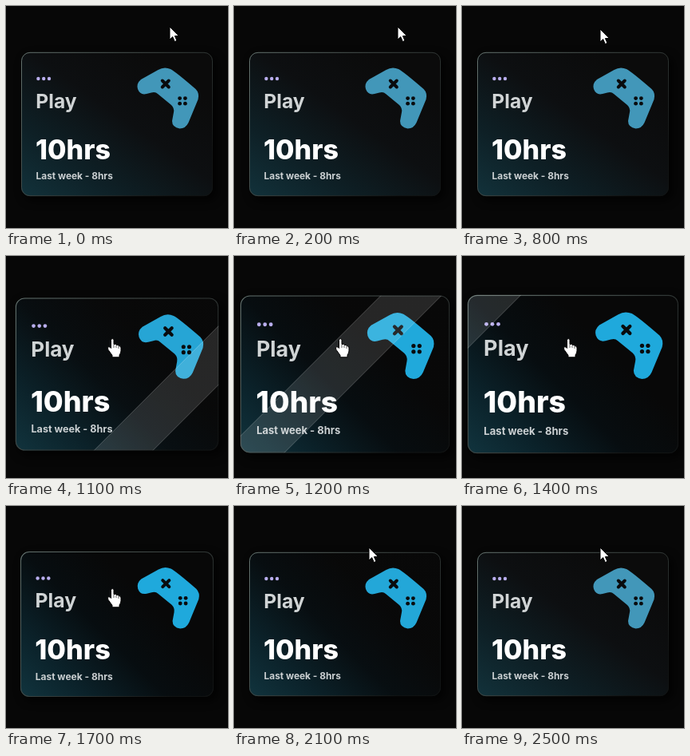
An HTML page for the animation above (2.6 s loop, 278 by 278 pixels).

```html
<!DOCTYPE html>
<html lang="en">
<head>
<meta charset="utf-8">
<title>Play time card</title>
<style>
  html, body { margin: 0; width: 100%; height: 100%; overflow: hidden; background: #070707; }
  svg { display: block; width: 100vw; height: 100vh; }
  text { font-family: Inter, Roboto, sans-serif; }
</style>
</head>
<body>
<svg viewBox="0 0 278 278">
  <defs>
    <linearGradient id="restFill" x1="0" y1="1" x2=".8" y2=".15">
      <stop offset="0" stop-color="#12323b"/>
      <stop offset=".3" stop-color="#0e2026"/>
      <stop offset=".65" stop-color="#0d0f11"/>
      <stop offset="1" stop-color="#0b0b0b"/>
    </linearGradient>
    <linearGradient id="hoverFill" gradientUnits="userSpaceOnUse" x1="19" y1="238" x2="159" y2="98">
      <stop offset="0" stop-color="#11343e"/>
      <stop offset=".3" stop-color="#0b222a"/>
      <stop offset=".65" stop-color="#070d10"/>
      <stop offset="1" stop-color="#080808"/>
    </linearGradient>
    <linearGradient id="edge" x1="0" y1="0" x2="1" y2=".7">
      <stop offset="0" stop-color="#65736f"/>
      <stop offset=".5" stop-color="#3c4442"/>
      <stop offset="1" stop-color="#111313"/>
    </linearGradient>
    <filter id="blur" x="-20%" y="-20%" width="140%" height="140%">
      <feGaussianBlur stdDeviation="6"/>
    </filter>
    <clipPath id="cardClip"><rect x="19" y="58" width="240" height="180" rx="11"/></clipPath>
  </defs>

  <rect width="278" height="278" fill="#070707"/>
  <g id="card">
    <rect x="22" y="62" width="243" height="182" rx="12" fill="#020202" opacity=".7" filter="url(#blur)"/>
    <rect x="19" y="58" width="240" height="180" rx="11" fill="url(#restFill)"/>
    <rect id="glow" x="19" y="58" width="240" height="180" rx="11" fill="url(#hoverFill)"/>
    <rect x="19.5" y="58.3" width="239" height="179.4" rx="10.5" fill="none" stroke="url(#edge)"/>

    <g fill="#b9aeee">
      <circle cx="40.4" cy="91" r="2.2"/>
      <circle cx="47.2" cy="91" r="2.2"/>
      <circle cx="54" cy="91" r="2.2"/>
    </g>
    <text x="37.3" y="127.5" font-size="24.6" font-weight="700" fill="#d0d4d5">Play</text>
    <text x="37" y="192" font-size="34" font-weight="800" fill="#fff">10hrs</text>
    <text x="37.5" y="217" font-size="11.9" font-weight="650" fill="#cbd0d2">Last week - 8hrs</text>

    <path id="pad" d="M190.5 80Q198 75.5 206 79Q212 82 237.5 104Q242.5 109 240.5 117L228.5 146Q225 153.5 217.5 153.5Q208 152 208 144L210 133Q211 128 207 124L190 110Q187 107 182 108.5L176 110Q168 112 165 104Q163 97 169 92Z"/>
    <path d="M195.8 93.5L203.8 101.5M203.8 93.5L195.8 101.5" stroke="#090b0d" stroke-width="4" stroke-linecap="round"/>
    <g fill="#090b0d">
      <circle cx="217.6" cy="115.6" r="2.4"/>
      <circle cx="224.4" cy="115.6" r="2.4"/>
      <circle cx="217.6" cy="122.2" r="2.4"/>
      <circle cx="224.4" cy="122.2" r="2.4"/>
    </g>

    <g clip-path="url(#cardClip)">
      <path id="sheen" d="M0 0H69.5L-208.5 278H-278Z" fill="#fff" fill-opacity=".12" stroke="#fff" stroke-opacity=".24" stroke-width=".9"/>
    </g>
  </g>

  <g fill="#fff" stroke="#000" stroke-width="1" stroke-linejoin="round">
    <path id="arrow" d="M0 0V16L3.7 12.6L6.3 18.6L9 17.4L6.4 11.6L11.3 11.4Z"/>
    <g id="hand">
      <path d="M4.5 2.5Q4.5 .6 6.3 .6Q8 .6 8 2.5V7.5Q10.4 6.5 11.2 8.5Q13.4 7.5 14.2 9.7Q17 9.2 17 12V16Q16.6 19 15 21V23.8H6V21.4L1 14.4Q-.5 11.5 1.7 10.7Q3.2 10.7 4.5 12.5Z"/>
      <path d="M8 8V12M11 9V12M14 10V13" fill="none" stroke-width=".6"/>
    </g>
  </g>
</svg>
<script>
const LOOP = 2600, STEP = 100;
const [card, glow, pad, sheen, arrow, hand] =
  ['card', 'glow', 'pad', 'sheen', 'arrow', 'hand'].map(id => document.getElementById(id));

const mix = (a, b, p) => a + (b - a) * p;
const progress = (t, start, length) => Math.min(1, Math.max(0, (t - start) / length));

// The CSS "ease" curve, solved by bisection.
function ease(x) {
  const curve = (a, b, u) => 3 * a * u * (1 - u) ** 2 + 3 * b * u * u * (1 - u) + u ** 3;
  let low = 0, high = 1;
  for (let i = 0; i < 20; i++) {
    const mid = (low + high) / 2;
    if (curve(.25, .25, mid) < x) low = mid; else high = mid;
  }
  return curve(.1, 1, low);
}

// Linear interpolation through rows of [time, ...values].
function along(rows, t) {
  const next = rows.findIndex(row => row[0] > t);
  if (next < 0) return rows[rows.length - 1].slice(1);
  if (next === 0) return rows[0].slice(1);
  const a = rows[next - 1], b = rows[next];
  const p = (t - a[0]) / (b[0] - a[0]);
  return a.slice(1).map((v, i) => mix(v, b[i + 1], p));
}

const pointerPath = [
  [0, 205, 26], [700, 205, 26], [800, 173, 29], [900, 152, 55], [1000, 138, 88],
  [1100, 133, 104], [1700, 133, 104], [1800, 152, 74], [1900, 166, 54],
  [2100, 169, 52], [2500, 173, 52]
];
const sheenPath = [[900, 530], [1000, 455], [1100, 350], [1200, 238], [1300, 142], [1400, 68], [1500, 0]];

function render(t) {
  const hover = ease(progress(t, 990, 320)) - ease(progress(t, 1495, 310));
  const scale = 1 + .1 * hover;
  card.setAttribute('transform', `translate(139 148) scale(${scale}) translate(-139 -148)`);

  const lit = ease(progress(t, 950, 300)) - progress(t, 2050, 450);
  glow.setAttribute('opacity', lit);
  const tone = [[66, 31], [151, 169], [185, 220]].map(([a, b]) => Math.round(mix(a, b, lit)));
  pad.setAttribute('fill', `rgb(${tone})`);

  sheen.setAttribute('transform', `translate(${along(sheenPath, t)[0]} 0)`);

  const [x, y] = along(pointerPath, t);
  const pointing = t >= 1000 && t < 1900;
  arrow.setAttribute('visibility', pointing ? 'hidden' : 'visible');
  hand.setAttribute('visibility', pointing ? 'visible' : 'hidden');
  arrow.setAttribute('transform', `translate(${x} ${y})`);
  hand.setAttribute('transform', `translate(${x - 6} ${y - 1})`);
}

const began = performance.now();
function tick() {
  const t = (performance.now() - began) % LOOP;
  render(Math.floor(t / STEP) * STEP);
  requestAnimationFrame(tick);
}
tick();
</script>
</body>
</html>
```
